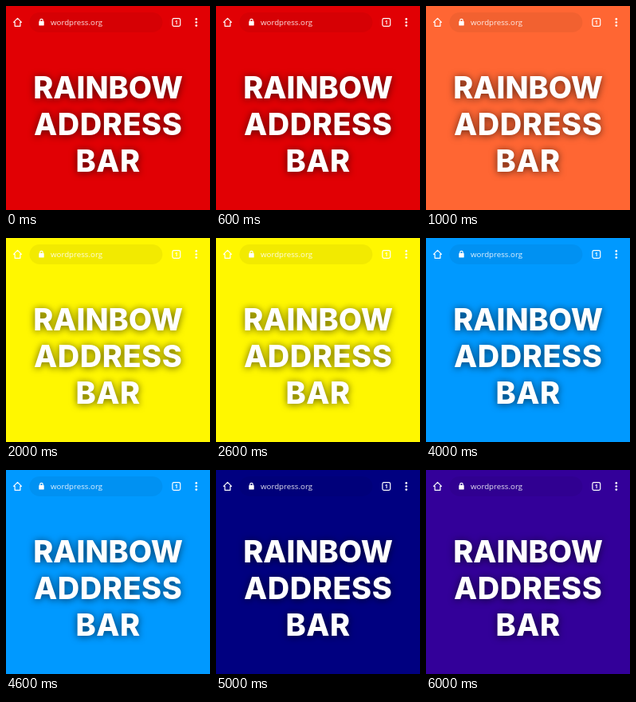
Recreate the animation shown at these times as an HTML page. Size 256 by 256 pixels, loop 7000 ms.

```html
<!DOCTYPE html>
<html lang="en">
<head>
<meta charset="utf-8">
<title>Rainbow Address Bar</title>
<style>
  html, body { margin: 0; width: 100%; height: 100%; overflow: hidden; }
  svg { display: block; width: 100vw; height: 100vh; }
  .title {
    font: 800 38px Inter, sans-serif;
    text-anchor: middle;
    filter: drop-shadow(0 1px 5px rgba(0, 0, 0, .62));
  }
  .wide { letter-spacing: .5px; }
  .url { font: 400 9.7px "Open Sans", sans-serif; }
  .count { font: 700 7px "Open Sans", sans-serif; text-anchor: middle; }
  .line { fill: none; stroke: #fff; stroke-width: 1.2; stroke-linejoin: round; }
</style>
</head>
<body>
<svg viewBox="0 0 256 256" fill="#fff">
  <rect id="page" width="256" height="256" fill="#e10004"/>
  <rect x="29.4" y="8" width="167" height="25" rx="12.5" fill="#000" fill-opacity=".05"/>

  <path class="line" d="M9.6 20.3 14.5 15.4 19.4 20.3H17.9V25.3H11.1V20.3Z"/>

  <rect x="41.3" y="19.1" width="6.4" height="5.5" rx=".7"/>
  <path class="line" d="M42.8 19.4V18a1.7 1.7 0 0 1 3.4 0V19.4"/>
  <text class="url" x="56" y="24" fill-opacity=".88">wordpress.org</text>

  <rect class="line" x="208.9" y="15.6" width="9.8" height="9.8" rx="1.8"/>
  <text class="count" x="213.8" y="23.1">1</text>

  <circle cx="238.8" cy="16.4" r="1.35"/>
  <circle cx="238.8" cy="20.5" r="1.35"/>
  <circle cx="238.8" cy="24.6" r="1.35"/>

  <g class="title">
    <text x="128.1" y="116">RAINBOW</text>
    <text class="wide" x="128.2" y="162">ADDRESS</text>
    <text class="wide" x="128.2" y="208">BAR</text>
  </g>
</svg>
<script>
  const colors = ["#e10004", "#ff6633", "#fff700", "#00c000", "#0099ff", "#000080", "#330099"];
  const hold = 1000;
  const page = document.getElementById("page");
  const start = performance.now();

  function draw(now) {
    const step = Math.floor(Math.max(0, now - start) / hold) % colors.length;
    page.setAttribute("fill", colors[step]);
    requestAnimationFrame(draw);
  }
  draw(start);
</script>
</body>
</html>
```
